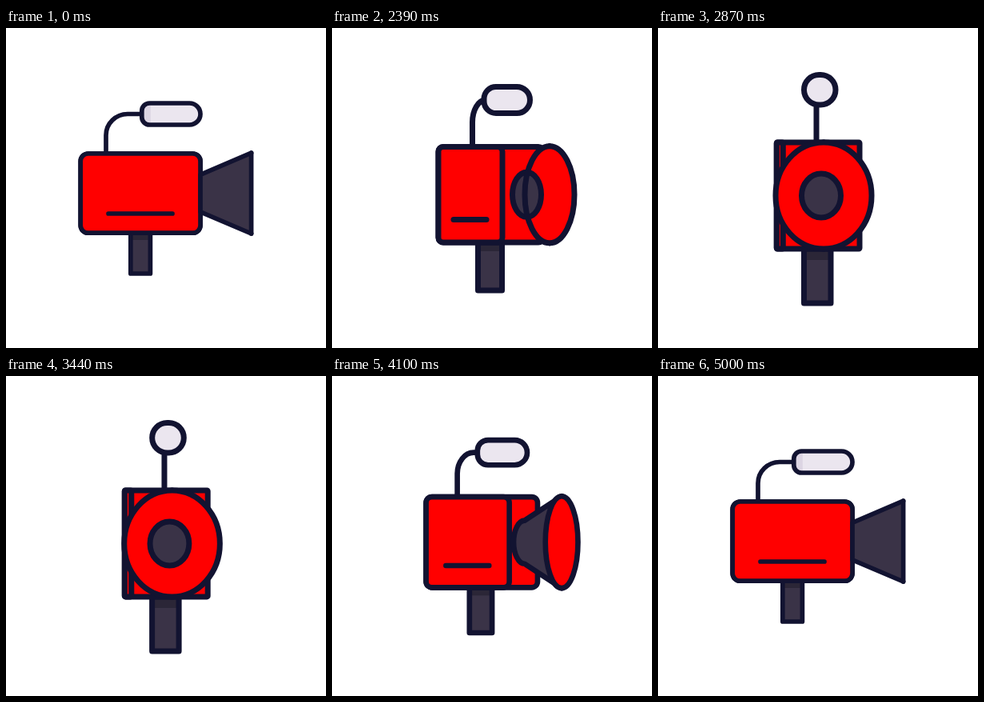
An HTML page with a canvas that plays this animation: 400 by 400 pixels, repeating every 5060 ms.

```html
<!DOCTYPE html>
<html lang="en">
<head>
<meta charset="utf-8">
<title>Turning camera</title>
<style>
  html, body { margin: 0; width: 100%; height: 100%; overflow: hidden; background: #fff; }
  canvas { display: block; width: 400px; height: 400px; }
</style>
</head>
<body>
<canvas id="stage" width="400" height="400"></canvas>
<script>
const ctx = document.getElementById('stage').getContext('2d');
const INK = '#121331', RED = '#ff0000', DARK = '#3a3347', SHADE = '#2b2637',
      LIGHT = '#ebe6ef', LIGHT_SHADE = '#dcd5e3';
const LOOP = 5060, START = 2030, STEP = 30;

// Turn amount over time: 0 is the side view, about 1 is the front view.
const TURN = [[0, 0], [2000, 0], [2390, .474], [2570, .775], [2870, .964], [3100, 1.02],
  [3620, .9], [3830, .737], [4175, .21], [4430, 0], [LOOP, 0]];
// Small sideways sway of the whole camera.
const SWAY = [[0, 0], [2000, 0], [2030, .8], [2160, 3], [2390, 0], [3830, 0], [4175, -3],
  [4430, -2.2], [4600, -3], [5000, 0], [LOOP, 0]];

// Each measure at four turn amounts.
const TURNS = [0, .474, .737, .964];
const POSES = {
  left: [93.2, 133, 148.5, 148.3],
  edge: [243, 213, 188, 156.3],
  right: [243, 264, 264.5, 252],
  top: [157, 148.5, 146, 143],
  bottom: [256.2, 268, 272, 276],
  corner: [9.5, 6, 3, 1],
  slotA: [128, 152, 158, 153],
  slotB: [208, 193, 177, 153],
  slotY: [232, 239.5, 243, 246],
  gripL: [155.8, 182.5, 190.5, 182.5],
  gripR: [180.4, 212.5, 222.5, 216],
  gripB: [307, 328, 338, 344],
  gripShade: [265, 279, 285, 290],
  micL: [169.8, 190, 194, 182.5],
  micR: [243, 247.5, 241.5, 222],
  micT: [94, 73.5, 65.5, 58.5],
  micB: [121, 106.5, 100, 96],
  micCorner: [9.5, 15, 17, 19],
  cableX: [125, 175.5, 195.5, 198],
  bendX: [152, 192, 205, 198],
  bendY: [134, 118, 116, 110],
  ringX: [306.6, 272, 243, 207],
  ringW: [0, 31, 47.5, 60],
  ringH: [50.4, 60.5, 63.5, 66.5],
  holeX: [243, 243.5, 232, 204],
  holeW: [0, 18, 19.5, 24.5],
  holeH: [23.3, 28, 27.5, 27.5],
  line: [5.7, 7, 7.2, 7]
};

// Smooth curve through points, without overshoot; straight beyond the last one.
function curve(points, x) {
  const n = points.length - 1;
  const slope = i => (points[i + 1][1] - points[i][1]) / (points[i + 1][0] - points[i][0]);
  const tangent = i => {
    if (i === 0) return slope(0);
    if (i === n) return slope(n - 1);
    const a = slope(i - 1), b = slope(i);
    return a * b > 0 ? 2 * a * b / (a + b) : 0;
  };
  if (x >= points[n][0]) return points[n][1] + (x - points[n][0]) * slope(n - 1);
  let i = 0;
  while (x >= points[i + 1][0]) i++;
  const [x0, y0] = points[i], [x1, y1] = points[i + 1];
  const w = x1 - x0, s = (x - x0) / w, r = 1 - s;
  return y0 * (1 + 2 * s) * r * r + y1 * (3 - 2 * s) * s * s
    + w * s * r * (tangent(i) * r - tangent(i + 1) * s);
}

function poseAt(turn) {
  const pose = {};
  for (const key in POSES) pose[key] = curve(POSES[key].map((v, i) => [TURNS[i], v]), turn);
  pose.edge = Math.max(pose.edge, pose.left);
  // The opening swings outwards early in the turn.
  if (turn < TURNS[1]) pose.ringX += 6 * Math.sin(Math.PI * turn / TURNS[1]) ** 2;
  return pose;
}

function paint(path, fill) {
  if (fill) {
    ctx.fillStyle = fill;
    ctx.fill(path);
  }
  ctx.stroke(path);
}

function box(l, t, r, b, radii = 0) {
  const path = new Path2D();
  path.roundRect(l, t, r - l, b - t, radii);
  return path;
}

function oval(x, y, rx, ry) {
  const path = new Path2D();
  path.ellipse(x, y, Math.max(rx, 0), ry, 0, 0, 2 * Math.PI);
  return path;
}

function drawMic(p, turn) {
  const midY = (p.micT + p.micB) / 2;
  const cable = new Path2D();
  cable.moveTo(p.cableX, p.top);
  cable.lineTo(p.cableX, p.bendY);
  cable.bezierCurveTo(p.cableX, p.bendY + (midY - p.bendY) * .55,
    p.bendX + (p.cableX - p.bendX) * .55, midY, p.bendX, midY);
  cable.lineTo(Math.max(p.bendX, p.micL), midY);
  paint(cable);

  const round = Math.min(p.micB - p.micT, p.micR - p.micL) / 2;
  const inner = Math.min(p.micCorner, round);
  const mic = box(p.micL, p.micT, p.micR, p.micB, [inner, round, round, inner]);
  ctx.fillStyle = LIGHT;
  ctx.fill(mic);
  const band = 11 * (1 - turn / TURNS[1]);
  if (band > 0) {
    ctx.save();
    ctx.clip(mic);
    ctx.fillStyle = LIGHT_SHADE;
    ctx.fillRect(p.micL, p.micT, band, p.micB - p.micT);
    ctx.restore();
  }
  paint(mic);
}

function drawGrip(p) {
  const grip = box(p.gripL, p.bottom, p.gripR, p.gripB);
  ctx.fillStyle = DARK;
  ctx.fill(grip);
  ctx.fillStyle = SHADE;
  ctx.fillRect(p.gripL, p.bottom, p.gripR - p.gripL, p.gripShade - p.bottom);
  paint(grip);
}

function drawBody(p) {
  const r = Math.max(p.corner, 0);
  paint(box(p.left, p.top, p.right, p.bottom, r), RED);
  paint(box(p.left, p.top, p.edge, p.bottom, Math.min(r, (p.edge - p.left) / 2)), RED);
  if (p.slotB - p.slotA > 2) {
    const slot = new Path2D();
    slot.moveTo(p.slotA, p.slotY);
    slot.lineTo(p.slotB, p.slotY);
    paint(slot);
  }
}

function drawLens(p) {
  const y = (p.top + p.bottom) / 2;
  const hole = oval(p.holeX, y, p.holeW, p.holeH);
  const ring = oval(p.ringX, y, p.ringW, p.ringH);

  // Cone outline: one slanted side, the near half of the small end, the other side.
  const cone = new Path2D();
  cone.moveTo(p.ringX, y + p.ringH);
  cone.lineTo(p.holeX, y + p.holeH);
  cone.ellipse(p.holeX, y, p.holeW, p.holeH, 0, Math.PI / 2, Math.PI * 1.5);
  cone.lineTo(p.ringX, y - p.ringH);
  paint(cone, DARK);

  ctx.fillStyle = RED;
  ctx.fill(ring);
  ctx.save();
  ctx.clip(ring);
  paint(hole, DARK);
  ctx.restore();
  paint(ring);
}

function draw(t) {
  const turn = curve(TURN, t), p = poseAt(turn);
  ctx.setTransform(1, 0, 0, 1, 0, 0);
  ctx.fillStyle = '#fff';
  ctx.fillRect(0, 0, 400, 400);
  ctx.translate(curve(SWAY, t), 0);
  ctx.strokeStyle = INK;
  ctx.lineWidth = p.line;
  ctx.lineCap = ctx.lineJoin = 'round';
  drawMic(p, turn);
  drawGrip(p);
  drawBody(p);
  drawLens(p);
}

const begin = performance.now();
function frame() {
  const t = (performance.now() - begin) % LOOP;
  const step = Math.floor((t - START) / STEP);
  draw(step < 0 ? 0 : Math.min(START + step * STEP, 5000));
  requestAnimationFrame(frame);
}
frame();
</script>
</body>
</html>
```
